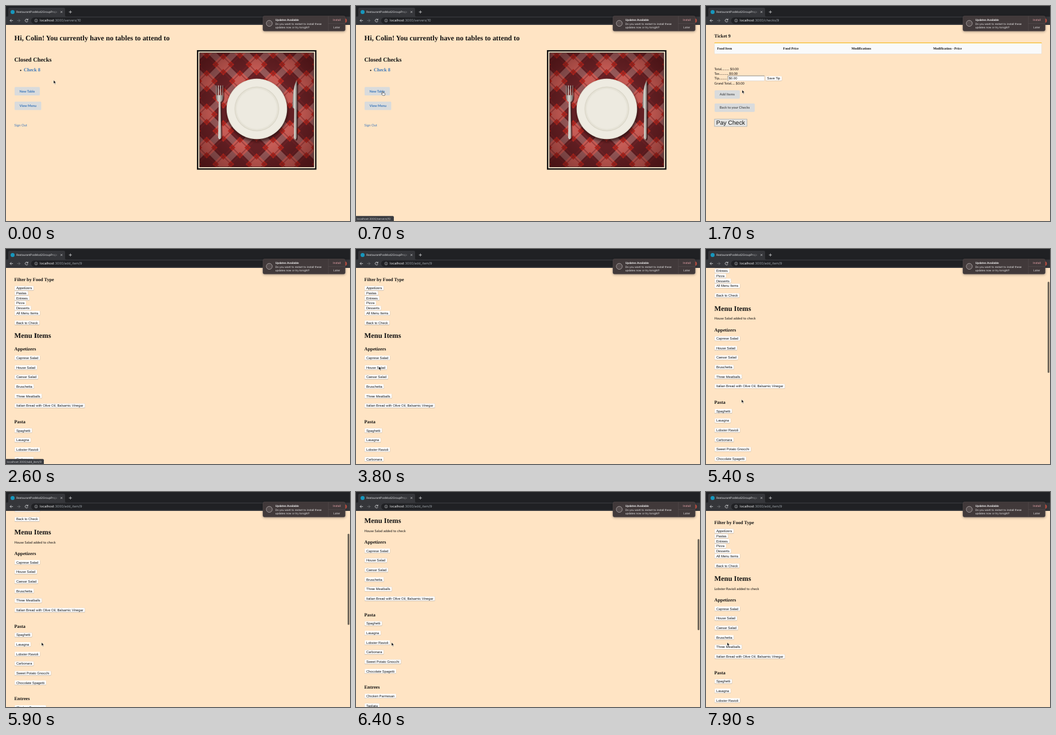
An HTML page for the animation above (8 s loop, 600x375 px).

```html
<!DOCTYPE html>
<html lang="en">
<head>
<meta charset="utf-8">
<title>Restaurant checks</title>
<style>
  html, body { margin: 0; width: 100%; height: 100%; overflow: hidden; background: bisque; }
  svg { display: block; width: 100vw; height: 100vh; }
  text { text-rendering: geometricPrecision; white-space: pre; }
  .serif { font-family: "Liberation Serif", serif; font-weight: 700; }
  .lato { font-family: Lato, sans-serif; }
  .sans { font-family: "Liberation Sans", sans-serif; }
  .ui { font-family: Inter, sans-serif; }
  .bold { font-weight: 700; }
  .semi { font-weight: 600; }
  .mid { text-anchor: middle; }
</style>
</head>
<body>
<svg viewBox="0 0 600 375">
  <defs>
    <pattern id="plaid" width="41" height="41" patternUnits="userSpaceOnUse" patternTransform="translate(437 179) rotate(45)">
      <path fill="#b9281f" d="M0 0h41v41H0z"/>
      <path fill="#2c1a28" opacity=".6" d="M0 0h14v41H0zM0 0h41v14H0z"/>
      <path fill="#d9a5a0" opacity=".42" d="M22 0h11v41h-11zM0 22h41v11H0z"/>
      <path fill="#7e2428" opacity=".5" d="M17 0h2v41h-2zM36 0h2v41h-2zM0 17h41v2H0zM0 36h41v2H0z"/>
    </pattern>
    <radialGradient id="vignette" r=".75">
      <stop offset=".45" stop-color="#200" stop-opacity="0"/>
      <stop offset="1" stop-color="#200" stop-opacity=".5"/>
    </radialGradient>
    <linearGradient id="steel">
      <stop offset="0" stop-color="#77716c"/><stop offset=".45" stop-color="#dedad3"/><stop offset="1" stop-color="#6d6662"/>
    </linearGradient>
    <linearGradient id="tabFade">
      <stop offset="0" stop-color="#35363a" stop-opacity="0"/><stop offset="1" stop-color="#35363a"/>
    </linearGradient>
    <filter id="shadow" x="-20%" y="-20%" width="140%" height="150%"><feGaussianBlur stdDeviation="2"/></filter>
  </defs>

  <path fill="bisque" d="M0 0h600v375H0z"/>
  <g id="home"></g>
  <g id="check"></g>
  <g id="menu"></g>
  <g id="saladMenu"></g>
  <g id="ravioliMenu"></g>
  <rect id="scrollbar" x="595.8" width="3.2" height="159" rx="1.6" fill="#71675b"/>
  <g id="chrome"></g>
  <g id="status"></g>

  <g id="arrow" stroke="#fff" stroke-width=".5" stroke-linejoin="round">
    <path d="M0 0v5.9l1.4-1.3 1 2.3 1-.4-1-2.2h1.9z"/>
  </g>
  <path id="hand" fill="#fff" stroke="#000" stroke-width=".5" stroke-linejoin="round"
        d="M0 0c.7-.6 1.2 0 1.2.5v2l3 .7c.7.3.6 1 .4 1.8L4 7H.6L-1.700 4.200c-.2-.8.6-.9 1-.4L0 4.300z"/>
  <path id="ibeam" fill="none" stroke="#333" stroke-width=".6" d="M-1.300-3.500Q0-3.500 0-2.600V2.600Q0 3.500-1.300 3.500M1.300-3.500Q0-3.500 0-2.600M0 2.600Q0 3.500 1.300 3.500"/>
</svg>

<script>
const LOOP = 8000, BODY = 5.83, H1 = 12.45, H3 = 8.22;
const LINK = '#3b77ba', INK = '#111';
const el = id => document.getElementById(id);
const fill = (id, ...parts) => { el(id).innerHTML = parts.join(''); };

const ruler = document.createElement('canvas').getContext('2d');
ruler.font = '100px "Liberation Sans", sans-serif';
const textWidth = s => ruler.measureText(s).width * BODY / 100;

const text = (x, y, s, cls, size = BODY, color = INK) =>
  `<text x="${x}" y="${y}" class="${cls}" font-size="${size}" fill="${color}">${s}</text>`;
const rect = (x, y, w, h, color, extra = '') =>
  `<rect x="${x}" y="${y}" width="${w}" height="${h}" fill="${color}" ${extra}/>`;
const path = (d, color, extra = '') => `<path d="${d}" fill="${color}" ${extra}/>`;
const line = (d, color, width = .8) => path(d, 'none', `stroke="${color}" stroke-width="${width}"`);
const circle = (x, y, r, color, extra = '') => `<circle cx="${x}" cy="${y}" r="${r}" fill="${color}" ${extra}/>`;

// Plain white button, centred vertically on y
function plainButton(y, label, x = 15) {
  const w = textWidth(label) + 5.8;
  return rect(x, y - 3.6, w, 7.9, '#b9ada0', 'rx="1"') +
    rect(x + .2, y - 3.7, w - .4, 7.4, '#fff', 'rx="1"') +
    text(x + 2.9, y + 2.1, label, 'sans');
}
const softButton = (y, w, label, color) =>
  rect(15, y, w, 14.8, '#d9dbdc', 'rx="1.6"') + text(15 + w / 2, y + 9.5, label, 'lato bold mid', BODY, color);

function picture() {
  const plate = [[52.8, '#e4e1d5'], [51.5, '#eeebe1'], [39, '#dbd7c9'], [37.6, '#e6e3d7'], [35, '#edeae0']];
  const fork = 'M366 138.500h1.400v17h2.300v-17h1.500v17h2.300v-17h1.500v17h2.300v-17h1.400v20q0 6-4.300 9l1 62q-2.700 6-5.400 0l1-62q-5-3-5-9z';
  const knife = 'M507.500 128.500v51l-.6 50q-2 7-4.700 0l.5-50-3-3q0-35 7.800-48z';
  return rect(333, 77, 208.500, 208.500, '#111') + rect(335.4, 79.4, 203.7, 203.7, '#fbe9cf') +
    rect(337.3, 81.3, 199.9, 199.900, '#1c1010') + rect(338, 82, 198.500, 198.500, 'url(#plaid)') +
    rect(338, 82, 198.500, 198.500, 'url(#vignette)') +
    circle(438.500, 183, 53.500, '#200b0d', 'opacity=".65" filter="url(#shadow)"') +
    plate.map(([r, color]) => circle(437.500, 179.500, r, color)).join('') +
    [fork, knife].map(d => path(d, '#200b0d', 'opacity=".6" transform="translate(2 2)"') + path(d, 'url(#steel)')).join('');
}

fill('home',
  text(14.6, 59.6, 'Hi, Colin! You currently have no tables to attend to', 'serif', H1),
  text(14.6, 97.2, 'Closed Checks', 'serif', 10.4),
  circle(25.600, 112.300, 1.100, INK),
  text(31, 114.400, 'Check 8', 'serif', 8.35, LINK),
  softButton(141.300, 44, 'New Table', LINK),
  softButton(166.800, 46.500, 'View Menu', LINK),
  text(14.6, 209.600, 'Sign Out', 'lato', BODY, LINK),
  picture());

const columns = [[19.5, 'Food Item'], [134.6, 'Food Price'], [253.8, 'Modifications'], [396.2, 'Modification - Price']];
const totals = [
  [112, 'Total', 10, 42], [120, 'Tax', 12, 40.3], [128.4, 'Tip', 10], [136.600, 'Grand Total', 5, 52]
];
fill('check',
  text(14.6, 55.3, 'Ticket 9', 'serif', H3),
  rect(14.7, 64.4, 570.700, 19.200, '#f9fafb', 'rx="1.5" stroke="#d9d3ca" stroke-width=".4"'),
  rect(14.6, 63.8, 571, 1.300, '#f6bd25', 'rx=".6"'),
  columns.map(([x, s]) => text(x, 75.600, s, 'serif')).join(''),
  totals.map(([y, label, dots, x]) =>
    text(14.6, y, label + '.'.repeat(dots), 'lato') + (x ? text(x, y, '$0.00', 'lato') : '')).join(''),
  rect(38.3, 121.900, 63.700, 8.700, '#fff', 'stroke="#c9c4bd" stroke-width=".5"'),
  line('M38.300 130.500v-8.600h63.700', '#77726c', .7),
  text(39.800, 128.300, '$0.00', 'sans'),
  plainButton(126.300, 'Save Tip', 103.700),
  softButton(146.900, 44, 'Add Items', '#58595b'),
  softButton(169.900, 70, 'Back to your Checks', '#58595b'),
  rect(14.9, 197.200, 56.600, 12.800, '#e6e6e4', 'stroke="#8d99a3" stroke-width=".6"'),
  text(17.8, 206.900, 'Pay Check', 'sans', 10.4));

const sections = {
  Appetizers: ['Caprese Salad', 'House Salad', 'Caesar Salad', 'Bruschetta', 'Three Meatballs', 'Italian Bread with Olive Oil, Balsamic Vinegar'],
  Pasta: ['Spaghetti', 'Lasagna', 'Lobster Ravioli', 'Carbonara', 'Sweet Potato Gnocchi', 'Chocolate Spagetti'],
  Entrees: ['Chicken Parmesan', 'Tagliata']
};
function menuPage(added) {
  const filters = ['Appetizers', 'Pastas', 'Entrees', 'Pizza', 'Desserts', 'All Menu Items'];
  let out = text(14.6, 55.5, 'Filter by Food Type', 'serif', H3) +
    filters.map((s, i) => plainButton(68.100 + i * 8.740, s)).join('') +
    plainButton(128.400, 'Back to Check') + text(14.6, 155.200, 'Menu Items', 'serif', H1);
  if (added) out += text(14.6, 170.900, added + ' added to check', 'lato');
  let y = added ? 188.200 : 174.500;
  for (const [title, items] of Object.entries(sections)) {
    out += text(14.6, y + 2.900, title, 'serif', H3);
    items.forEach((s, i) => { out += plainButton(y + 15.300 + i * 16.670, s); });
    y += 15.300 + (items.length - 1) * 16.670 + 28;
  }
  return out;
}
fill('menu', menuPage());
fill('saladMenu', menuPage('House Salad'));
fill('ravioliMenu', menuPage('Lobster Ravioli'));

fill('chrome',
  rect(0, 0, 600, 33, '#202124'),
  path('M0 18.500h2q2 0 2-2v-11q0-2.500 2.500-2.500h94q2.500 0 2.500 2.500v11q0 2 2 2h495V33H0z', '#35363a'),
  rect(44, 19.900, 542, 11, '#202124', 'rx="5.5"'),
  circle(11.5, 10.500, 3.500, '#1797bd'),
  text(18, 12.200, 'RestaurantPosMod2GroupProje', 'ui', 4.8, '#e3e4e6'),
  rect(80, 6, 12, 9, 'url(#tabFade)'),
  line('M95.100 8.800l3.200 3.200m0-3.200l-3.200 3.200', '#d5d6d8', .7),
  line('M109.700 10.400h5.200M112.300 7.800v5.200', '#d5d6d8', .8),
  line('M12.200 25.400H7m2.500-2.500L7 25.400l2.500 2.500', '#e0e1e3'),
  line('M19.500 25.400h5.200m-2.500-2.500l2.500 2.500-2.500 2.500', '#77797d'),
  line('M37.700 23.700a2.500 2.500 0 1 0 .5 2.500M38.200 22.200v2.200h-2.300', '#e0e1e3'),
  circle(52.5, 25.400, 2.500, 'none', 'stroke="#c5c7ca" stroke-width=".6"'),
  line('M52.500 25v1.900M52.500 23.700v.7', '#c5c7ca', .7),
  '<text x="59" y="27.300" class="ui" font-size="5.8" fill="#f1f2f3">localhost<tspan id="url" fill="#9aa0a6"></tspan></text>',
  circle(590.500, 25.400, 4, '#cf5546'),
  rect(448, 18, 144, 27, '#000', 'rx="3" opacity=".35" filter="url(#shadow)"'),
  rect(448, 17.300, 143.700, 26.500, '#41393a', 'rx="3" stroke="#5f5657" stroke-width=".4"'),
  circle(459.200, 30.300, 5.200, '#554c4d', 'stroke="#c5bfbf" stroke-width=".7"'),
  text(469.700, 25.500, 'Updates Available', 'ui semi', 4.75, '#fff'),
  text(469.700, 32.600, 'Do you want to restart to install these', 'ui', 4.6, '#f0eeee'),
  text(469.700, 38.500, 'updates now or try tonight?', 'ui', 4.6, '#f0eeee'),
  line('M562.300 17.500v26.200M562.300 30.600h29.400', '#5d5455', .5),
  text(577, 25.900, 'Install', 'ui mid', 4.9, '#eda7ad'),
  text(577, 39.200, 'Later', 'ui mid', 4.9, '#dedada'));

fill('status',
  path('M0 366.300h64q2 0 2 2V375H0z', '#3a3b3f'),
  '<text id="statusText" x="1.600" y="372.500" class="ui" font-size="4.75" fill="#d2d4d7"></text>');

// Each entry holds from its time until the next one
const pages = [[0, 'home', 'servers/10'], [900, 'check', 'checks/9'], [2400, 'menu', 'add_item/9'],
  [4400, 'saladMenu', 'add_item/9'], [7900, 'ravioliMenu', 'add_item/9']];
const statuses = [[0, ''], [400, 'servers/10'], [900, ''], [2200, 'add_item/9'], [2700, '']];
const pointers = [[0, 'arrow'], [400, 'hand'], [900, 'arrow'], [2200, 'hand'], [2400, 'ibeam'], [2700, 'arrow']];

const cursorPath = [[0, 83, 129.5], [100, 83, 129.5], [500, 46, 149], [1200, 46, 149], [1700, 63, 146.5],
  [2000, 63, 146.5], [2300, 52.5, 151], [2600, 52.5, 151], [3300, 40, 205], [4400, 40, 205],
  [4800, 62, 262.4], [6900, 62, 262.4], [7400, 37, 262.4], [8000, 37, 262.4]];
const scrollPath = [[0, 0], [4900, 0], [5400, 47.5], [6200, 101], [7900, 101], [7901, 0], [8000, 0]];

const current = (list, t) => list.filter(([start]) => start <= t).pop();
function along(keys, t, ease) {
  const i = keys.findIndex(k => k[0] > t), a = keys[i - 1], b = keys[i];
  const k = ease((t - a[0]) / (b[0] - a[0]));
  return a.slice(1).map((v, j) => v + (b[j + 1] - v) * k);
}
const smooth = k => k * k * (3 - 2 * k);
const show = (id, on) => { el(id).style.display = on ? '' : 'none'; };

function render(t) {
  const [, page, route] = current(pages, t);
  pages.forEach(([, id]) => show(id, id === page));
  el('url').textContent = ':3000/' + route;

  const status = current(statuses, t)[1];
  show('status', status);
  el('statusText').textContent = 'localhost:3000/' + status;

  const [scroll] = along(scrollPath, t, k => k);
  el('saladMenu').setAttribute('transform', `translate(0 ${-scroll})`);
  el('scrollbar').setAttribute('y', 34.9 + scroll * .467);
  el('scrollbar').style.opacity = t < 5000 ? 0 : Math.max(0, Math.min(1, (7300 - t) / 250));

  const pointer = current(pointers, t)[1];
  const [x, y] = along(cursorPath, t, smooth);
  ['arrow', 'hand', 'ibeam'].forEach(id => show(id, id === pointer));
  el(pointer).setAttribute('transform', `translate(${x} ${y})`);
}

function tick() {
  render(performance.now() % LOOP);
  requestAnimationFrame(tick);
}
tick();
</script>
</body>
</html>
```
